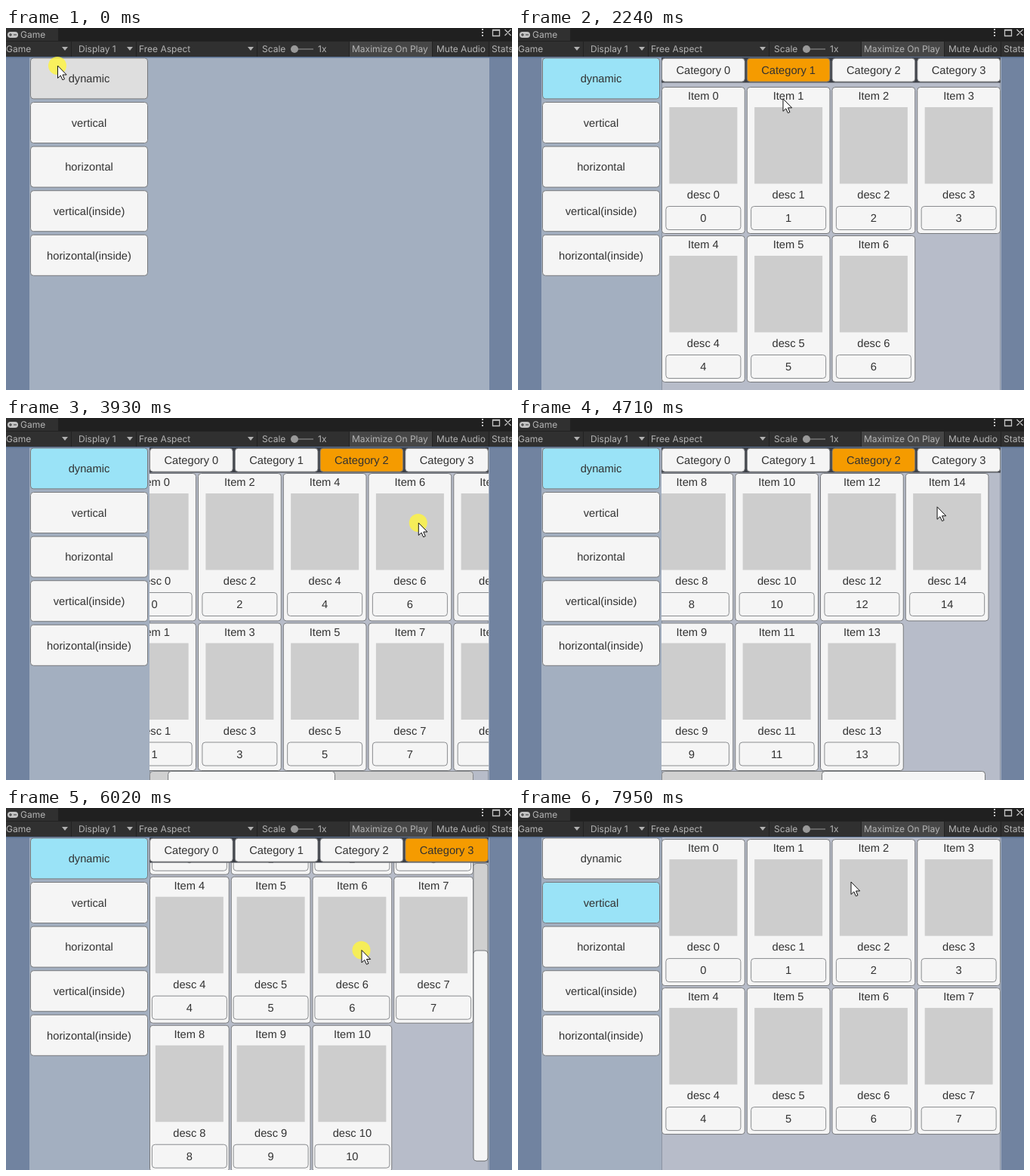
Recreate the animation shown at these times as an HTML page. Size 670 by 480 pixels, loop 8000 ms.

```html
<!DOCTYPE html>
<html lang="en">
<head>
<meta charset="utf-8">
<title>Scroll list demo</title>
<style>
  html, body { margin: 0; width: 100%; height: 100%; overflow: hidden; background: #7183a0; }
  svg { display: block; width: 670px; height: 480px; }
  text { font: 14.7px "Liberation Sans", Arial, sans-serif; fill: #323232; text-anchor: middle; text-rendering: geometricPrecision; pointer-events: none; }
  .bar text { font: 12px Inter, sans-serif; fill: #b4b4b4; text-anchor: start; }
  .box { fill: #f5f5f5; stroke: #77797c; }
  .small { stroke: #8a8c8f; }
  .hot.over { fill: #eeeeee; }
  .hot.down { fill: #dedede; }
  .menu.on { fill: #9ae3f7; }
  .tab.on { fill: #f59b00; }
  .track { fill: #d0d0d0; stroke: #85878a; }
  .pic { fill: #cdcdcd; }
  #pointer { pointer-events: none; }
</style>
</head>
<body>
<svg id="stage" viewBox="0 0 670 480">
  <defs>
    <clipPath id="below-tabs"><rect x="190" y="72.5" width="449" height="408"/></clipPath>
    <clipPath id="full"><rect x="190" y="39" width="449" height="441"/></clipPath>
  </defs>
  <rect width="670" height="480" fill="#7183a0"/>
  <rect x="31" y="38" width="609" height="442" fill="#a3afc0"/>
  <rect y="38" width="670" height="1.5" fill="#596f91"/>
  <g class="bar">
    <rect width="670" height="17" fill="#202020"/>
    <rect width="69" height="17" fill="#303030"/>
    <rect y="17" width="670" height="21" fill="#303030"/>
    <rect x="455" y="17" width="109" height="21" fill="#464646"/>
    <path d="M0 17.5H670M86.5 17V38M172.5 17V38M332.5 17V38M454.5 17V38M564.5 17V38M639.5 17V38M69.5 0V17" stroke="#222"/>
    <path d="M74 25h8l-4 5zM160 25h8l-4 5zM320 25h8l-4 5z" fill="#b0b0b0"/>
    <path d="M377 28H407" stroke="#656565" stroke-width="2"/>
    <circle cx="382" cy="28" r="5" fill="#999"/>
    <rect x="2" y="5" width="14" height="8" rx="4" fill="#c4c4c4"/>
    <path d="M4 9h4M6 7v4M11 8v2M13 8v2" stroke="#303030"/>
    <path d="M630 1h2v2h-2zM630 5h2v2h-2zM630 9h2v2h-2z" fill="#c4c4c4"/>
    <path d="M644.5 2.5h9v8h-9zM644 3h10M660.5 2l8 8m0-8l-8 8" fill="none" stroke="#c4c4c4" stroke-width="1.3"/>
  </g>
  <g id="panels"></g>
  <g id="menu"></g>
  <g id="pointer">
    <circle id="glow" cx="-.5" r="12" fill="#fff53c" fill-opacity=".8"/>
    <path d="M0 0V16.5L3.8 13 6.4 18.8 9 17.7 6.5 12H11.7Z" fill="#fff" stroke="#111"/>
  </g>
</svg>
<script>
const LOOP = 8000, STEP = 1000 / 13;
const LEFT = 190, WIDTH = 449, TOP = 39, TABS = 34, GAP = 2, PAD = 5, BAR = 20, COLUMNS = 4;
const HOLD = 150, OPEN_DELAY = 130, SETTLE = 660;

const $ = id => document.getElementById(id);
const clamp = (v, lo, hi) => Math.min(hi, Math.max(lo, v));
const mix = (a, b, p) => a + (b - a) * p;
const smooth = p => p * p * (3 - 2 * p);
const outBack = p => 1 + 2.7 * (p - 1) ** 3 + 1.7 * (p - 1) ** 2;
const columnWidth = width => (width - GAP * (COLUMNS - 1)) / COLUMNS;

function add(parent, tag, attrs, content) {
  const el = document.createElementNS('http://www.w3.org/2000/svg', tag);
  for (const key in attrs) el.setAttribute(key, attrs[key]);
  if (content !== undefined) el.textContent = content;
  parent.append(el);
  return el;
}
const flat = (g, x, y, width, height, attrs) => add(g, 'rect', { x, y, width, height, ...attrs });
// the outline lies inside the given bounds
const box = (g, x, y, w, h, cls) => flat(g, x + .5, y + .5, w - 1, h - 1, { rx: 4, class: cls });
const label = (g, x, y, text) => add(g, 'text', { x, y: y + 5.2 }, text);

function button(g, x, y, w, h, text, cls) {
  const el = box(g, x, y, w, h, 'box hot ' + cls);
  label(g, x + w / 2, y + h / 2, text);
  return el;
}

function card(g, x, y, w, h, n) {
  const mid = x + w / 2;
  box(g, x, y, w, h, 'box');
  label(g, mid, y + 11.8, 'Item ' + n);
  flat(g, mid - 45, y + 27, 90, 101.5, { class: 'pic' });
  label(g, mid, y + 143.2, 'desc ' + n);
  button(g, mid - 50, y + 158, 100, 32, n, 'small');
}

const toolbar = { 'Display 1': 96, 'Free Aspect': 176, Scale: 339, '1x': 413, 'Maximize On Play': 458, 'Mute Audio': 570, Stats: 643, Game: 0 };
const bar = document.querySelector('.bar');
add(bar, 'text', { x: 19, y: 13 }, 'Game');
for (const text in toolbar) add(bar, 'text', { x: toolbar[text], y: 32 }, text);

const menu = ['dynamic', 'vertical', 'horizontal', 'vertical(inside)', 'horizontal(inside)']
  .map((text, i) => button($('menu'), 32, 39.4 + i * 58.6, 156, 55, text, 'menu'));

function buildPanel({ count, across, plain }, index) {
  const top = TOP + (plain ? 1 : TABS);
  const view = across ? WIDTH : 488.5 - top;
  const rowHeight = across ? 196.5 : 195;
  const lines = Math.ceil(count / (across ? 2 : COLUMNS));
  const span = (across ? columnWidth(WIDTH) : rowHeight) + GAP;
  const content = lines * span - GAP + 2 * PAD;
  const scrolls = content > view;
  const cardWidth = columnWidth(scrolls && !across ? WIDTH - BAR : WIDTH);

  const g = add($('panels'), 'g', {});
  flat(g, LEFT, TOP, WIDTH, 441, { fill: '#b7bcc9' });
  add(g, 'path', { d: 'M190.5 39V480M638.5 39V480', stroke: '#8c94a3' });
  const clip = add(g, 'g', { 'clip-path': `url(#${plain ? 'full' : 'below-tabs'})` });
  const list = add(clip, 'g', {});
  for (let n = 0; n < count; n++) {
    const col = across ? n >> 1 : n % COLUMNS, row = across ? n % 2 : Math.floor(n / COLUMNS);
    const x = LEFT + col * (cardWidth + GAP) + (across ? PAD : 0);
    card(list, x, top + row * (rowHeight + GAP) + (across ? 0 : PAD), cardWidth, rowHeight, n);
  }

  const track = view - BAR;
  let handle;
  if (scrolls) {
    const place = across ? [LEFT, top + 395, track, BAR] : [LEFT + WIDTH - BAR - .5, top, BAR, track];
    box(g, ...place, 'track');
    handle = box(g, ...place, 'box');
  }
  if (!plain) {
    flat(g, LEFT, TOP, WIDTH, TABS - .5, { fill: '#3d4047' });
    const w = columnWidth(WIDTH);
    for (let i = 0; i < COLUMNS; i++)
      button(g, LEFT + i * (w + GAP), 39.7, w, 32, 'Category ' + i, i === index ? 'tab on' : 'tab');
  }
  return { g, list, handle, across, view, content, track, limit: Math.max(0, content - view) };
}

const panels = [
  { count: 10, across: true },
  { count: 7 },
  { count: 15, across: true },
  { count: 11 },
  { count: 8, plain: true }
].map(buildPanel);

// what the hand does; each click opens the next panel
const hover = (t, x, y) => ({ down: t, up: t, x, y, dx: 0, dy: 0 });
const click = (t, x, y) => ({ ...hover(t, x, y), up: t + HOLD, opens: true });
const clickTab = (t, i) => click(t, LEFT + 48 + i * (columnWidth(WIDTH) + GAP), 50);
const drag = (down, up, x, y, dx, dy, fling = 0) => ({ down, up, x, y, dx, dy, fling, drags: true });

const gestures = [
  click(0, 68.5, 50), hover(900, 130, 42),
  drag(1220, 1690, 473, 132, -23, 8),
  clickTab(1950, 1), drag(2650, 3110, 352, 288, -3, -97),
  clickTab(3390, 2), drag(3840, 4200, 600, 140, -270, -5, -400), hover(4700, 555, 118),
  clickTab(5110, 3), drag(5470, 5840, 475, 390, -5, -205),
  drag(6010, 6340, 471, 188, -3, 187), hover(6630, 172, 217),
  click(6850, 133, 138), hover(7200, 133, 138),
  drag(7560, 7900, 441, 108, 0, -10)
];
const openings = gestures.filter(a => a.opens).map(a => a.down + OPEN_DELAY);
const panelAt = t => openings.findLastIndex(open => t >= open);
panels.forEach((panel, i) => {
  panel.drags = gestures.filter(a => a.drags && panelAt(a.down) === i);
});
const stops = gestures.flatMap(({ down, up, x, y, dx, dy }) =>
  [{ t: down, x, y }, { t: up, x: x + dx, y: y + dy }]);

function pointerAt(t) {
  const i = stops.findIndex(s => s.t > t);
  if (i < 0) return stops.at(-1);
  const a = stops[i - 1], b = stops[i], p = smooth((t - a.t) / (b.t - a.t));
  return { x: mix(a.x, b.x, p), y: mix(a.y, b.y, p) };
}

// drags resist beyond the ends; a released list springs back
function offsetAt({ drags, across, view, limit }, t) {
  const inside = v => clamp(v, -limit, 0);
  const resist = v => {
    const over = v - inside(v);
    return inside(v) + Math.sign(over) * view * (1 - 1 / (1 + Math.abs(over) * .55 / view));
  };
  let offset = 0;
  drags.forEach((d, i) => {
    if (t < d.down) return;
    const p = smooth(clamp((t - d.down) / (d.up - d.down), 0, 1));
    offset = resist(offset + (across ? d.dx : d.dy) * p);
    const until = Math.min(t, drags[i + 1]?.down ?? t);
    if (until > d.up)
      offset = mix(offset, inside(offset + d.fling), outBack(Math.min(1, (until - d.up) / SETTLE)));
  });
  return offset;
}

function scrollPanel(panel, t) {
  const { list, handle, across, view, content, track, limit } = panel;
  const offset = offsetAt(panel, t);
  const shift = v => across ? `translate(${v} 0)` : `translate(0 ${v})`;
  list.setAttribute('transform', shift(offset));
  if (!handle) return;
  const shown = clamp(-offset, 0, limit), over = Math.abs(offset + shown);
  const length = BAR + (track - BAR) * (view - over) / content;
  handle.setAttribute(across ? 'width' : 'height', length - 1);
  handle.setAttribute('transform', shift((track - length) * shown / limit));
}

function render(t) {
  const current = panelAt(t);
  panels.forEach((p, i) => p.g.setAttribute('display', i === current ? 'inline' : 'none'));
  const selected = current < 0 ? -1 : current === panels.length - 1 ? 1 : 0;
  menu.forEach((el, i) => el.classList.toggle('on', i === selected));
  if (current >= 0) scrollPanel(panels[current], t);

  const { x, y } = pointerAt(t);
  const pressed = gestures.some(a => t >= a.down && t < a.up);
  $('pointer').setAttribute('transform', `translate(${x} ${y})`);
  $('glow').setAttribute('display', pressed ? 'inline' : 'none');

  document.querySelectorAll('.over').forEach(el => el.classList.remove('over', 'down'));
  const hit = document.elementFromPoint(x, y);
  if (hit?.classList.contains('hot')) {
    hit.classList.add('over');
    hit.classList.toggle('down', pressed && hit.matches('.menu, .tab'));
  }
}

const start = performance.now();
let shownStep = -1;
function tick() {
  const step = Math.floor(((performance.now() - start) % LOOP) / STEP);
  if (step !== shownStep) render((shownStep = step) * STEP + 20);
  requestAnimationFrame(tick);
}
tick();
</script>
</body>
</html>
```
